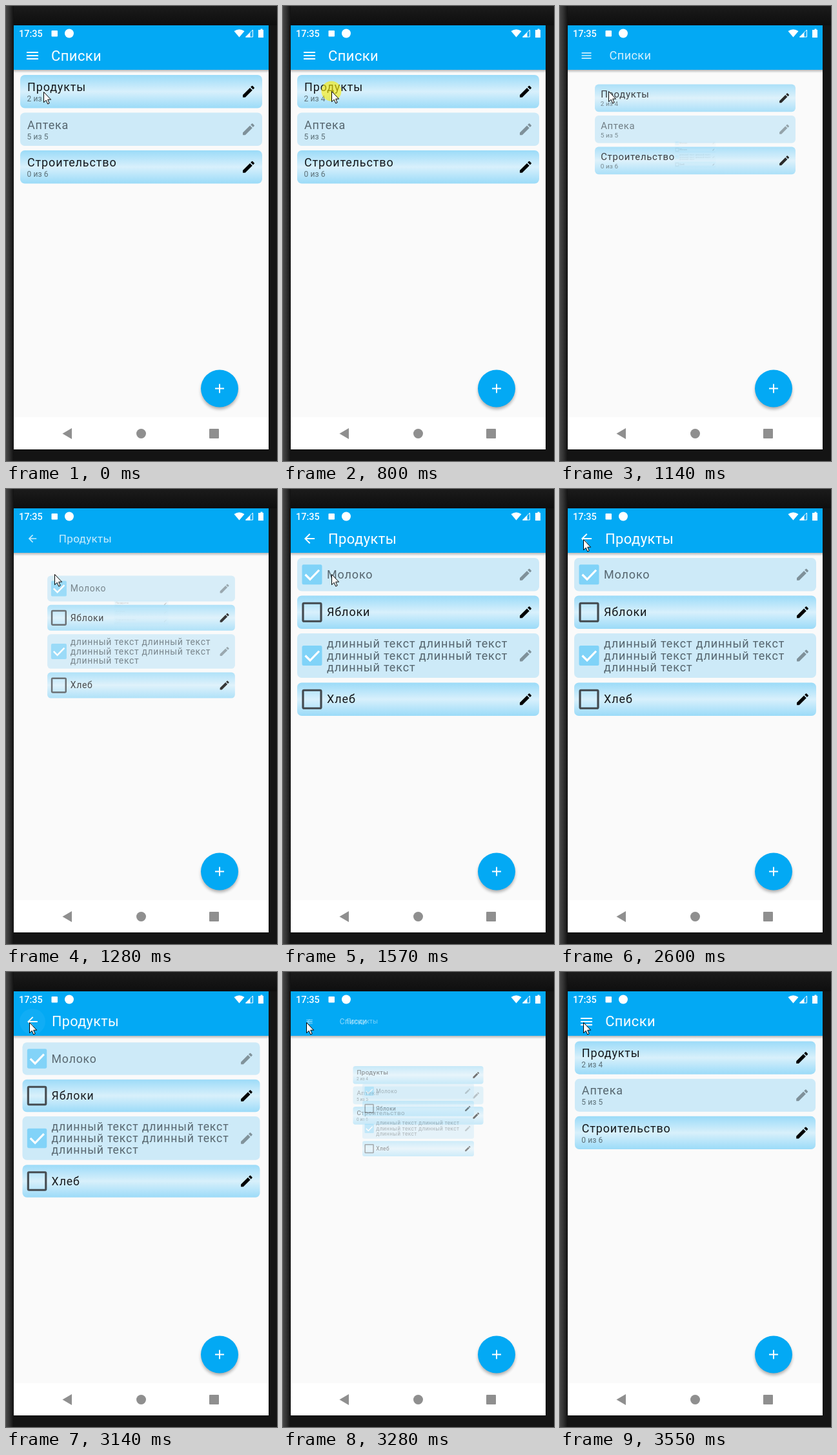
Recreate the animation shown at these times as an HTML page. Size 420 by 706 pixels, loop 3620 ms.

```html
<!DOCTYPE html>
<html lang="ru">
<head>
<meta charset="utf-8">
<title>Списки</title>
<style>
  html, body { margin: 0; width: 100%; height: 100%; overflow: hidden; background: #141414; }
  svg { display: block; width: 420px; height: 706px; font-family: Roboto, sans-serif; }
  .bar { fill: #fff; font-size: 22px; letter-spacing: .4px; }
  .name { font-size: 18px; letter-spacing: .85px; fill: #14181b; }
  .count { font-size: 12px; letter-spacing: .1px; fill: #5c7078; }
  .done .name { fill: #56666f; }
  .done .pen { opacity: .38; }
</style>
</head>
<body>
<svg viewBox="0 0 420 706" xmlns="http://www.w3.org/2000/svg">
  <defs>
    <linearGradient id="sky" x2="0" y2="1">
      <stop stop-color="#9bdbf8"/>
      <stop offset=".5" stop-color="#d8f0fc"/>
      <stop offset="1" stop-color="#9bdbf8"/>
    </linearGradient>
    <linearGradient id="edge">
      <stop stop-color="#464646"/>
      <stop offset=".4" stop-color="#343434"/>
      <stop offset="1" stop-color="#111"/>
    </linearGradient>
    <linearGradient id="top" x2="0" y2="1">
      <stop stop-color="#1b1b1b"/>
      <stop offset="1" stop-color="#0e0e0e"/>
    </linearGradient>
    <linearGradient id="shade" x2="0" y2="1">
      <stop stop-color="#000" stop-opacity=".26"/>
      <stop offset="1" stop-color="#000" stop-opacity="0"/>
    </linearGradient>
    <filter id="blur" x="-30%" y="-30%" width="160%" height="160%"><feGaussianBlur stdDeviation="2.6"/></filter>
    <path id="pen" d="M3 17.25V21h3.75L17.81 9.94l-3.75-3.75zM20.71 7.04a1 1 0 0 0 0-1.41l-2.34-2.34a1 1 0 0 0-1.41 0l-1.83 1.83 3.75 3.75z"/>
  </defs>

  <!-- phone body -->
  <rect width="420" height="706" fill="#141414"/>
  <rect width="420" height="30" fill="url(#top)"/>
  <rect width="12" height="706" fill="url(#edge)"/>

  <!-- screen -->
  <rect x="12" y="30" width="395" height="608" fill="#fafafa"/>
  <rect x="12" y="638" width="395" height="50" fill="#fff"/>
  <rect x="12" y="99" width="395" height="5" fill="url(#shade)"/>
  <rect x="12" y="30" width="395" height="69" fill="#03a9f4"/>

  <!-- status bar -->
  <g fill="#fff">
    <text x="20" y="48" font-size="14.5" font-weight="500">17:35</text>
    <rect x="70.5" y="38" width="9.5" height="9.5" rx="1"/>
    <circle cx="98" cy="42.5" r="7"/>
    <path d="M361.5 48.5 353.5 39Q361.5 33.5 369.5 39Z"/>
    <path d="M371.5 48 382.5 37V48Z" fill="none" stroke="#fff"/>
    <path d="M371 48.5 378.5 41V48.5Z"/>
    <path d="M393 37h1.5v-1.5h3V37h1.5v12h-8V37Z"/>
  </g>

  <!-- navigation and add button -->
  <g fill="#8f8f8f">
    <path d="M87.5 663.5 102 655V672Z"/>
    <circle cx="209.5" cy="663.5" r="7.5"/>
    <rect x="315" y="656" width="15" height="15" rx="1"/>
  </g>
  <circle cx="331" cy="597" r="28.5" opacity=".32" filter="url(#blur)"/>
  <circle cx="331" cy="593.5" r="29" fill="#03a9f4"/>
  <path d="M324 593.5h14M331 586.5v14" stroke="#fff" stroke-width="2"/>

  <!-- the two pages -->
  <circle id="ripple" cx="41" cy="77" r="20" fill="#fff"/>
  <g id="menu"><path fill="#fff" d="M32 83h18v-2H32zM32 78h18v-2H32zM32 71v2h18v-2z"/></g>
  <g id="back"><path fill="#fff" transform="translate(29 65)" d="M20 11H7.83l5.59-5.59L12 4l-8 8 8 8 1.41-1.41L7.83 13H20z"/></g>
  <g id="titleA"><text class="bar" x="70" y="84.5">Списки</text></g>
  <g id="titleB"><text class="bar" x="70" y="84.5">Продукты</text></g>
  <g id="pageA"></g>
  <g id="pageB"></g>

  <!-- pointer -->
  <g id="mouse">
    <circle id="glow" r="15.5" fill="#ffee00" opacity=".6"/>
    <path d="M.5.5V16.6L4.2 13.2 6.7 19 9.2 17.9 6.7 12.2H11.6Z" fill="#fff" stroke="#000" stroke-linejoin="round"/>
  </g>
</svg>
<script>
const LOOP = 3620;
const $ = id => document.getElementById(id);

// moments at which the picture is refreshed
const TICKS = [0, 140, 210, 800, 930, 1000, 1070, 1140, 1210, 1280, 1350, 1420, 1490, 1570,
  1970, 2040, 2110, 2180, 2250, 2320, 2390, 2460, 2530, 2600,
  2930, 3000, 3070, 3140, 3210, 3280, 3340, 3410, 3480, 3550];

// time, x, y
const PATH = [[0, 58, 133], [140, 66, 132], [210, 75, 132], [1900, 75, 132], [1970, 74, 130],
  [2180, 63, 107], [2390, 50, 83], [2460, 48, 79], [2530, 40, 78], [2600, 36, 78], [LOOP, 36, 78]];

function card(y, h, done, body) {
  return `<g class="${done ? 'done' : ''}">
    <rect x="22" y="${y}" width="375" height="${h}" rx="7" fill="${done ? '#cdeaf8' : 'url(#sky)'}"/>
    ${body}<use class="pen" href="#pen" x="364" y="${y + h / 2 - 12}"/></g>`;
}

function listCard(y, name, count, done) {
  return card(y, 51.5, done, `<text class="name" x="33" y="${y + 25}">${name}</text>
    <text class="count" x="32.5" y="${y + 41}">${count}</text>`);
}

function itemCard(y, lines, done) {
  const h = lines.length > 1 ? 69 : 51.5, mid = y + h / 2;
  const box = done
    ? `<rect x="29.5" y="${mid - 15.5}" width="31" height="31" rx="2.5" fill="#80d3f8"/>
       <path d="M34.5 ${mid}l7.5 7.5 14-14.5" fill="none" stroke="#fff" stroke-width="3.2"/>`
    : `<rect x="31" y="${mid - 14}" width="28" height="28" rx="1.5" fill="none" stroke="#434a4f" stroke-width="3.2"/>`;
  const first = mid + 6.2 - (lines.length - 1) * 9.25;
  const text = lines.map((s, i) => `<text class="name" x="68" y="${first + i * 18.5}">${s}</text>`);
  return card(y, h, done, box + text.join(''));
}

const long = 'длинный текст';
$('pageA').innerHTML = listCard(107, 'Продукты', '2 из 4')
  + listCard(165.5, 'Аптека', '5 из 5', true)
  + listCard(224, 'Строительство', '0 из 6');
$('pageB').innerHTML = itemCard(107, ['Молоко'], true)
  + itemCard(165.5, ['Яблоки'])
  + itemCard(224, [`${long} ${long}`, `${long} ${long}`, long], true)
  + itemCard(300.5, ['Хлеб']);

// cubic-bezier(.4, 0, .2, 1)
function ease(x) {
  if (x <= 0) return 0;
  if (x >= 1) return 1;
  let lo = 0, hi = 1, u;
  for (let i = 0; i < 24; i++) {
    u = (lo + hi) / 2;
    const v = 1 - u;
    if (1.2 * u * v * v + .6 * u * u * v + u * u * u < x) lo = u; else hi = u;
  }
  return u * u * (3 - 2 * u);
}

function zoom(id, s, cx, cy) {
  const el = $(id);
  el.setAttribute('transform', `translate(${cx} ${cy}) scale(${s}) translate(${-cx} ${-cy})`);
  el.setAttribute('opacity', s);
}

function pointer(t) {
  const i = PATH.findIndex(p => p[0] > t);
  const [t0, x0, y0] = PATH[i - 1], [t1, x1, y1] = PATH[i];
  const k = (t - t0) / (t1 - t0);
  return [x0 + (x1 - x0) * k, y0 + (y1 - y0) * k];
}

const within = (t, a, b) => t >= a && t < b;

function draw(time) {
  const t = TICKS.filter(s => s <= time).pop();
  const p = ease((t - 1030) / 500) - ease((t - 3097) / 500);
  zoom('menu', 1 - p, 41, 77);
  zoom('titleA', 1 - p, 108.5, 77);
  zoom('pageA', 1 - p, 209.5, 191.5);
  zoom('back', p, 41, 77);
  zoom('titleB', p, 122.5, 77);
  zoom('pageB', p, 209.5, 229.5);
  $('ripple').setAttribute('opacity', within(t, 2930, 3210) ? .2 * (1 - (t - 2930) / 280) : 0);
  $('mouse').setAttribute('transform', `translate(${pointer(t)})`);
  $('glow').setAttribute('opacity', within(t, 800, 930) || within(t, 2930, 3070) ? .6 : 0);
}

const start = performance.now();
function frame() {
  draw((performance.now() - start) % LOOP);
  requestAnimationFrame(frame);
}
frame();
</script>
</body>
</html>
```
